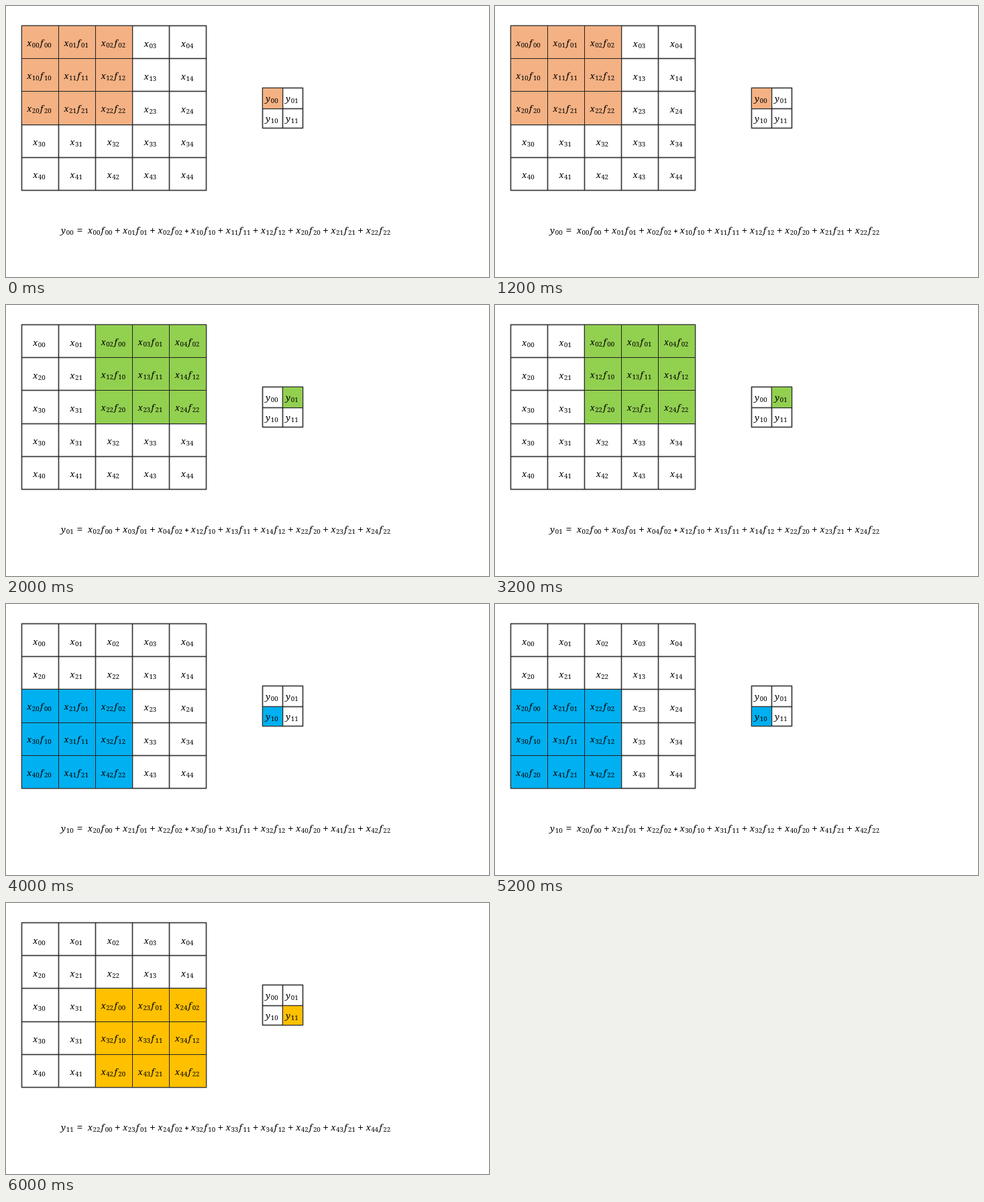
Write an HTML page that moves like this. It is 720x405 px and loops after 8 s.

```html
<!DOCTYPE html>
<html lang="en">
<head>
<meta charset="utf-8">
<title>Convolution, stride two</title>
<style>
html, body { margin: 0; width: 100%; height: 100%; overflow: hidden; background: #fff; }
svg { display: block; width: 100%; height: 100%; }
text { font: italic 13.3px "Noto Serif", serif; }
.sub { font-size: 9.7px; font-style: normal; }
.op { font-size: 16px; font-style: normal; text-anchor: middle; }
.small { font: bold 10px "Open Sans", sans-serif; text-anchor: middle; }
.lines { fill: none; stroke: #222; shape-rendering: crispEdges; }
.shadow { filter: drop-shadow(.9px .9px 1.2px rgba(0, 0, 0, .75)); }
</style>
</head>
<body>
<svg id="stage" viewBox="0 0 720 405"></svg>
<script>
const stage = document.getElementById('stage');
const COLORS = ['#f4b183', '#92d050', '#00b0f0', '#ffc000'];
const STEP = 2000;

// Line positions of both grids
const INPUT = { xs: [23, 78, 133, 188, 243, 298], ys: [29, 78, 127, 177, 226, 275] };
const OUTPUT = { xs: [382, 412, 442], ys: [122, 153, 182] };

// Letter and subscript, e.g. x with 00
const symbol = (x, y, letter, sub) =>
  `<text x="${x}" y="${y}">${letter}<tspan class="sub" x="${x + 7.8}" y="${y + 2}">${sub}</tspan></text>`;

const product = (x, y, xSub, fSub) =>
  symbol(x, y, 'x', xSub) +
  `<text x="${x + 20}" y="${y}">f<tspan class="sub" x="${x + 25.9}" y="${y + 2}">${fSub}</tspan></text>`;

const sign = (x, y, char, cls = 'op') => `<text class="${cls}" x="${x}" y="${y}">${char}</text>`;

// Grid with one filled square block of cells
function grid({ xs, ys }, row, col, size, color) {
  const path = xs.map(x => `M${x + .5} ${ys[0]}V${ys.at(-1) + 1}`).join('') +
    ys.map(y => `M${xs[0]} ${y + .5}H${xs.at(-1) + 1}`).join('');
  const lines = `<path class="lines" d="${path}"/>`;
  const x = xs[col], y = ys[row];
  const w = xs[col + size] - x, h = ys[row + size] - y;
  const block = `<rect x="${x}" y="${y}" width="${w}" height="${h}" fill="${color}"/>`;
  return `<g class="shadow">${lines}</g>${block}${lines}`;
}

function draw(step) {
  const outRow = step >> 1, outCol = step & 1;
  const top = outRow * 2, left = outCol * 2;
  let svg = grid(INPUT, top, left, 3, COLORS[step]) + grid(OUTPUT, outRow, outCol, 1, COLORS[step]);

  for (let r = 0; r < 5; r++) for (let c = 0; c < 5; c++) {
    const i = r - top, j = c - left;
    const x = 49.4 + 55.2 * c, y = 60.5 + 49.2 * r;
    if (i >= 0 && i < 3 && j >= 0 && j < 3) {
      svg += product(x - 18.4, y - .7, `${r}${c}`, `${i}${j}`);
    } else {
      // Idle cells of rows 1 and 2 carry the label of the row below
      const labelRow = c < 3 && (r === 1 || r === 2) ? r + 1 : r;
      svg += symbol(x - 9.4, y, 'x', `${labelRow}${c}`);
    }
  }

  for (let r = 0; r < 2; r++) for (let c = 0; c < 2; c++)
    svg += symbol(387 + 30 * c, 143.4 + 29.2 * r, 'y', `${r}${c}`);

  const base = 340;
  svg += symbol(82, base, 'y', `${outRow}${outCol}`) + sign(110, base + 1, '=');
  for (let k = 0; k < 9; k++) {
    const i = Math.floor(k / 3), j = k % 3;
    const x = 121.8 + 52.2 * k - (k > 2 ? 3 : 0);
    if (k === 3) svg += sign(269.3, base, '+', 'small');
    else if (k) svg += sign(x - 7.8, base + 1, '+');
    svg += product(x, base, `${top + i}${left + j}`, `${i}${j}`);
  }
  stage.innerHTML = svg;
}

let shown = -1;
function tick() {
  const step = Math.floor(performance.now() / STEP) % COLORS.length;
  if (step !== shown) draw(shown = step);
  requestAnimationFrame(tick);
}
tick();
</script>
</body>
</html>
```
